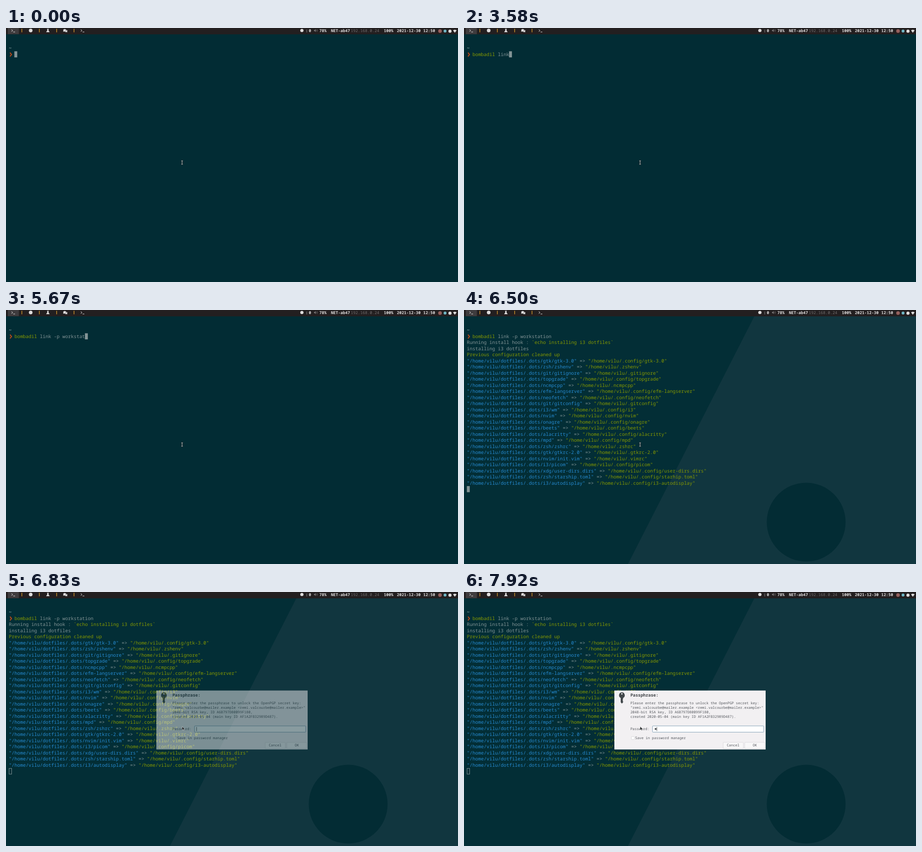
These frames come from a looping animation (998 px wide and 561 px high, 8000 ms). An HTML page:

```html
<!DOCTYPE html>
<html lang="en">
<head>
<meta charset="utf-8">
<title>Terminal session</title>
<style>
  html, body { margin: 0; width: 100%; height: 100%; overflow: hidden; background: #022c34; }
  svg { display: block; width: 100%; height: 100%; }
  text {
    font-family: "Noto Sans Mono", "DejaVu Sans Mono", monospace;
    white-space: pre;
    text-rendering: geometricPrecision;
  }
  #term text { font-size: 10.39px; font-weight: 500; fill: #839496; }
  #term .bold { font-weight: 700; }
  #term .unknown { fill: #cb4b16; font-weight: 700; }
  #term .green { fill: #859900; }
  #term .blue { fill: #268bd2; }
  #bar text { font-size: 8.75px; font-weight: 700; fill: #dedcdc; }
  #bar .dim { fill: #716e6f; font-weight: 500; }
  #dialog text { font-size: 7.77px; font-weight: 500; fill: #55585e; }
  #dialog .title { font-size: 9.4px; font-weight: 700; fill: #3f4347; }
  #dialog .mid { text-anchor: middle; }
</style>
</head>
<body>
<svg viewBox="0 0 998 561" preserveAspectRatio="none">
  <defs>
    <path id="shell" d="M-4 -2.6 L-1 -.3 L-4 2 M0 2.8 H4" fill="none" stroke="#e2e0e0" stroke-width="1"/>
  </defs>

  <rect width="998" height="561" fill="#022c34"/>
  <g id="wallpaper">
    <rect y="14" width="998" height="547" fill="#032e36"/>
    <path d="M641 14 H998 V561 H362 Z" fill="#11363f"/>
    <circle cx="755.5" cy="468.5" r="87" fill="#032c34"/>
  </g>

  <g id="bar">
    <rect width="998" height="14" fill="#231f20"/>
    <rect x="4" width="24.5" height="13.6" fill="#3f3c3e"/>
    <use href="#shell" x="16" y="6"/>
    <use href="#shell" x="169" y="6"/>
    <path d="M35 1.8 V9.6 M73.6 1.8 V9.6 M111.8 1.8 V9.6 M150.2 1.8 V9.6" stroke="#d8992c" stroke-width="1.4"/>
    <g fill="#dedcdc">
      <circle cx="54.5" cy="5.5" r="4"/>
      <path d="M90.5 1.8 H94.5 V2.7 H93.8 V5 L96.4 9.3 H88.6 L91.2 5 V2.7 H90.5 Z"/>
      <ellipse cx="129.6" cy="4.8" rx="3.2" ry="2.6"/>
      <path d="M127 5.5 L126.2 8.4 L130 7.2 Z"/>
      <path d="M133.6 4 C136 5 136 7 134.8 8 L135.6 9.6 L133 8.9 C131 9 129.8 8.4 129.5 7.9 C132 7.8 133.7 6.3 133.6 4 Z"/>
      <circle cx="653.3" cy="5.5" r="3.6"/>
      <circle cx="980.3" cy="7" r="3.5"/>
      <path d="M987 5.2 Q991 2.2 995 5.2 L991 10.4 Z"/>
    </g>
    <path d="M680 4.3 H681.7 L684 2.2 V9 L681.7 7 H680 Z" fill="#716e6f"/>
    <path d="M685.3 4 Q686.4 5.6 685.3 7.2 M686.7 2.7 Q688.7 5.6 686.7 8.5" fill="none" stroke="#716e6f" stroke-width=".8"/>
    <circle cx="958.3" cy="6.7" r="4" fill="#94605d"/>
    <circle cx="969.4" cy="6.7" r="3.2" fill="#6fb6c4"/>
    <text x="661.4" y="8.7">:</text>
    <text x="668.4" y="8.7">0</text>
    <text x="692" y="8.7">78%</text>
    <text x="717.4" y="8.7">NET-ab47</text>
    <text x="761.2" y="8.7" class="dim">192.168.0.24</text>
    <text x="834.3" y="8.7">100%</text>
    <text x="863" y="8.7">2021-12-30</text>
    <text x="921.3" y="8.7">12:50</text>
  </g>

  <g id="term">
    <text x="6.3" y="48.1" class="bold" style="fill:#8aa6a6">~</text>
    <path d="M8.8 54.4 L12.2 58.6 L8.8 62.8" fill="none" stroke="#cb4b16" stroke-width="1.9"/>
    <text x="18.7" y="61.6"><tspan id="command"></tspan><tspan id="args"></tspan></text>
    <g id="hook"></g>
    <g id="links"></g>
    <rect id="cursor" width="6.4" height="13.5" fill="#839496"/>
    <text id="covered" x="62.3" y="61.6" style="fill:#022c34">l</text>
    <rect id="hollow" x="6.8" y="389.6" width="5.6" height="12.6" fill="none" stroke="#839496" stroke-width="1"/>
  </g>

  <g id="dialog">
    <rect x="332" y="217.6" width="334" height="130.2" fill="#f2f0f2"/>
    <path d="M348.5 221.5 A6.6 6.6 0 0 1 351.3 234 V236 L350 237.4 L351.3 238.8 L350 240.2 L351.3 241.6 V243.6 L348.6 246.6 L346 243.6 V234 A6.6 6.6 0 0 1 348.5 221.5 Z" fill="#42484b"/>
    <circle cx="348.6" cy="224.9" r="1.6" fill="#f2f0f2"/>
    <text x="367.4" y="230.6" class="title">Passphrase:</text>
    <text x="367.4" y="248.2">Please enter the passphrase to unlock the OpenPGP secret key:</text>
    <text x="367.4" y="258.1">"remi.valcourbe@mailer.example &lt;remi.valcourbe@mailer.example&gt;"</text>
    <text x="367.4" y="268">2048-bit RSA key, ID A6B797D80B99F180,</text>
    <text x="367.4" y="277.9">created 2020-05-04 (main key ID AF1A2FB32989D487).</text>
    <text x="367.4" y="304.7">Password:</text>
    <rect x="416.2" y="295.8" width="245.6" height="13.8" rx="1" fill="#fff" stroke="#7f9fb4" stroke-width="1"/>
    <circle id="bullet" cx="423" cy="302.6" r="2" fill="#3f4347"/>
    <rect id="caret" y="298.2" width=".9" height="9" fill="#3f4347"/>
    <rect x="369.6" y="319.2" width="6.6" height="6.6" rx="1" fill="#fff" stroke="#cfced2" stroke-width=".8"/>
    <text x="377.8" y="324.8">Save in password manager</text>
    <g fill="#f8f7f8" stroke="#d6d5d9" stroke-width=".8">
      <rect x="572.2" y="332" width="44.6" height="14" rx="1"/>
      <rect x="619.8" y="332" width="44.2" height="14" rx="1"/>
    </g>
    <text x="594.2" y="341.3" class="mid">Cancel</text>
    <text x="642.2" y="341.3" class="mid">OK</text>
  </g>

  <g id="ibeam" fill="none">
    <path d="M387 293.2 H390.6 M388.8 293.2 V301 M387 301 H390.6" stroke="#0c1416" stroke-width="2.4"/>
    <path d="M387 293.2 H390.6 M388.8 293.2 V301 M387 301 H390.6" stroke="#c3cccd" stroke-width="1.1"/>
  </g>
  <path id="arrow" d="M389 297 V305 L390.8 303.4 L392 306 L393.2 305.4 L392.1 302.9 H394.4 Z" fill="#151718" stroke="#e4e6e6" stroke-width=".6"/>
</svg>

<script>
const LOOP = 8000, CELL = 6.235, ROW = 13.5, LEFT = 6.3, INPUT = 18.7, BASE = 61.6, TOP = 51.4;
const COMMAND = "bombadil", ARGS = " link -p workstation";
const $ = id => document.getElementById(id);

function addLine(parent, row, ...spans) {
  const ns = "http://www.w3.org/2000/svg";
  const line = document.createElementNS(ns, "text");
  line.setAttribute("x", LEFT);
  line.setAttribute("y", BASE + row * ROW);
  for (const [content, color = ""] of spans) {
    const span = document.createElementNS(ns, "tspan");
    span.textContent = content;
    span.setAttribute("class", color);
    line.append(span);
  }
  parent.append(line);
}

// "source>destination"; without a destination the entry maps to .config/source
const links = `gtk/gtk-3.0>.config/gtk-3.0 zsh/zshenv>.zshenv git/gitignore>.gitignore topgrade
  ncmpcpp>.ncmpcpp efm-langserver neofetch git/gitconfig>.gitconfig i3/wm>.config/i3 nvim onagre
  beets alacritty mpd zsh/zshrc>.zshrc gtk/gtkrc-2.0>.gtkrc-2.0 nvim/init.vim>.vimrc
  i3/picom>.config/picom xdg/user-dirs.dirs>.config/user-dirs.dirs
  zsh/starship.toml>.config/starhip.toml i3/autodisplay>.config/i3-autodisplay`.split(/\s+/);

addLine($("hook"), 1, ["Running install hook : "], ["`echo installing i3 dotfiles`", "green"]);
addLine($("hook"), 2, ["installing i3 dotfiles"]);
addLine($("links"), 3, ["Previous configuration cleaned up", "green"]);
links.forEach((entry, i) => {
  const [from, to = ".config/" + from] = entry.split(">");
  addLine($("links"), 4 + i,
    [`"/home/vilu/dotfiles/.dots/${from}"`, "blue"], [" => "], [`"/home/vilu/${to}"`, "green"]);
});

// Time of each keystroke
const keys = [
  1000, 1170, 1250, 1330, 1420, 1500, 1580, 1580,
  2000, 2420, 2580, 2830, 3000, 3670, 3750, 3920, 4330,
  4580, 4670, 4830, 5000, 5170, 5330, 5420, 5670, 5750, 5750, 5920
];
const CURSOR_LAG = [1580, 1670];
const KNOWN = 1750, ENTER = 6420, LINKED = 6500, PROMPT = 6620, FADE = 420, BULLET = 7420;

const show = (id, on) => { $(id).style.display = on ? "" : "none"; };

function place(id, x, y) {
  $(id).setAttribute("x", x);
  $(id).setAttribute("y", y);
}

function draw(t) {
  const typed = keys.filter(key => t >= key).length;
  const lagging = t >= CURSOR_LAG[0] && t < CURSOR_LAG[1];
  $("command").textContent = COMMAND.slice(0, typed);
  $("command").setAttribute("class", t < KNOWN ? "unknown" : "green");
  $("args").textContent = ARGS.slice(0, Math.max(0, typed - COMMAND.length));

  if (t < ENTER) place("cursor", INPUT - .3 + CELL * (typed - lagging), TOP);
  else place("cursor", LEFT, TOP + ROW * (t < LINKED ? 3 : 25));
  show("cursor", t < PROMPT);
  show("covered", lagging);
  show("hollow", t >= PROMPT);

  show("hook", t >= ENTER);
  show("links", t >= LINKED);
  show("wallpaper", t >= LINKED);

  $("dialog").style.opacity = Math.min(1, Math.max(0, (t - PROMPT) / FADE));
  show("bullet", t >= BULLET);
  $("caret").setAttribute("x", t < BULLET ? 420.4 : 425.4);
  show("ibeam", t < PROMPT);
  show("arrow", t >= PROMPT);
}

function tick() {
  draw(performance.now() % LOOP);
  requestAnimationFrame(tick);
}
tick();
</script>
</body>
</html>
```
